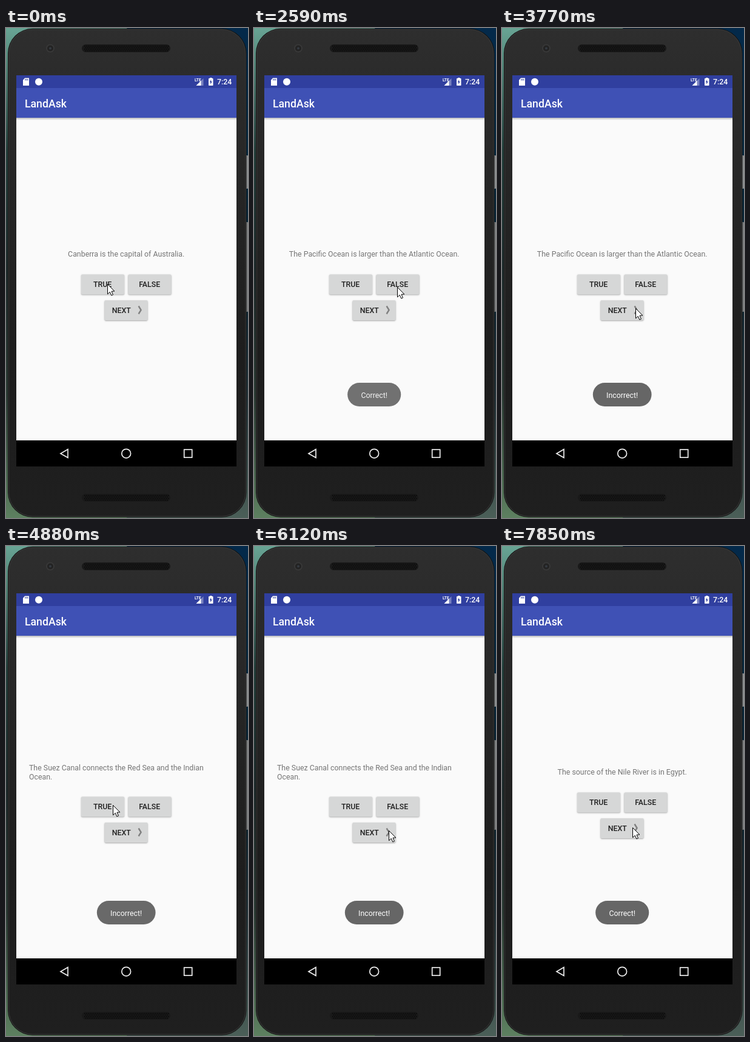
An HTML page with a canvas for the animation above (8 s loop, 399 by 808 pixels).

```html
<!DOCTYPE html>
<html lang="en">
<head>
<meta charset="utf-8">
<title>Geography quiz</title>
<style>
html, body { margin: 0; width: 100%; height: 100%; overflow: hidden; background: #1d2b30; }
canvas { display: block; width: 399px; height: 808px; }
</style>
</head>
<body>
<canvas id="stage"></canvas>
<script>
const W = 399, H = 808, LOOP = 8000;
const TICK = 136, FIRST_TICK = 480;
const MID = 198.2;

const canvas = document.getElementById('stage');
const dpr = window.devicePixelRatio || 1;
canvas.width = W * dpr;
canvas.height = H * dpr;
const ctx = canvas.getContext('2d');
ctx.scale(dpr, dpr);

const QUESTIONS = [
  { lines: ['Canberra is the capital of Australia.'], truth: 'TRUE' },
  { lines: ['The Pacific Ocean is larger than the Atlantic Ocean.'], truth: 'TRUE' },
  { lines: ['The Suez Canal connects the Red Sea and the Indian', 'Ocean.'], truth: 'FALSE' },
  { lines: ['The source of the Nile River is in Egypt.'], truth: 'FALSE' }
];
// Everything on screen follows from these taps
const TAPS = [
  { at: 480, button: 'TRUE', x: 167, y: 422 },
  { at: 1740, button: 'NEXT', x: 219, y: 462 },
  { at: 2830, button: 'FALSE', x: 236, y: 427 },
  { at: 4070, button: 'NEXT', x: 220, y: 462 },
  { at: 5150, button: 'TRUE', x: 176, y: 427 },
  { at: 6120, button: 'NEXT', x: 222, y: 469 },
  { at: 7160, button: 'FALSE', x: 241, y: 418 },
  { at: 8400, button: 'NEXT', x: 215, y: 464 }
];
const RIPPLE = 420, PAGE_DELAY = 140;
const LEAVE = 200, TRAVEL = 470;
const TOAST_DELAY = 200, TOAST_IN = 380, TOAST_END = 1950, TOAST_OUT = 330;

const clamp = v => Math.max(0, Math.min(1, v));
const smooth = p => p * p * (3 - 2 * p);
const isNext = tap => tap.button === 'NEXT';
const tapsBefore = t => TAPS.filter(tap => tap.at <= t);

function box(x, y, w, h, r, fill) {
  ctx.beginPath();
  ctx.roundRect(x, y, w, h, r);
  ctx.fillStyle = fill;
  ctx.fill();
}

function rect(x, y, w, h, fill) {
  ctx.fillStyle = fill;
  ctx.fillRect(x, y, w, h);
}

function poly(points, { fill, stroke, width = 1, closed = true }) {
  ctx.beginPath();
  points.forEach(([x, y]) => ctx.lineTo(x, y));
  if (closed) ctx.closePath();
  if (fill) {
    ctx.fillStyle = fill;
    ctx.fill();
  }
  if (stroke) {
    ctx.strokeStyle = stroke;
    ctx.lineWidth = width;
    ctx.stroke();
  }
}

function disc(x, y, r, fill) {
  ctx.beginPath();
  ctx.arc(x, y, r, 0, Math.PI * 2);
  ctx.fillStyle = fill;
  ctx.fill();
}

function label(text, x, y, { size = 12.36, weight = 400, color = '#fff', align = 'left' } = {}) {
  ctx.font = `${weight} ${size}px Roboto, sans-serif`;
  ctx.textAlign = align;
  ctx.fillStyle = color;
  ctx.fillText(text, x, y);
}

function fade(y0, y1, ...colors) {
  const g = ctx.createLinearGradient(0, y0, 0, y1);
  colors.forEach((c, i) => g.addColorStop(i / (colors.length - 1), c));
  return g;
}

function grille(y) {
  box(125, y, 146, 13, 6.5, '#191919');
  for (let row = 0; row < 4; row++)
    for (let x = 129 + row % 2 * 1.5; x < 268; x += 3)
      rect(x, y + 2 + row * 2.6, 1.5, 1.5, '#060606');
}

function drawDevice() {
  rect(0, 0, W / 2, H, fade(0, H, '#68a494', '#24403c', '#1f2b2c', '#2d3d36', '#5d8060'));
  rect(W / 2, 0, W / 2, H, fade(0, H, '#03294a', '#082a40', '#0a2230', '#24343a', '#4b5f58'));
  box(395, 210, 4, 55, 1, '#8c8e8f');
  box(395, 320, 4, 148, 1, '#7c7e7f');

  box(3, 0.8, 393.5, 806, 41, '#121212');
  box(4, 1.8, 391.5, 804, 40, '#3a3a3a');
  box(5, 2.8, 389.5, 802, 39, fade(0, H, '#2e2e2e', '#252525', '#1d1d1d', '#1f1f1f'));
  disc(73, 33.5, 7, '#383838');
  disc(73, 33.5, 5, '#232323');
  disc(73, 33.5, 2, '#343a40');
  grille(27);
  grille(768);
}

function drawStatusBar() {
  const bar = '#303f9f', white = { fill: '#fff' };
  rect(17, 78, 363, 21, bar);
  poly([[31, 82.5], [38, 82.5], [38, 95], [28, 95], [28, 86]], white);
  for (let x = 31.3; x < 37; x += 2) rect(x, 84, 1, 2.5, bar);
  disc(54, 88.7, 6, '#fff');

  label('LTE', 311, 88, { size: 6.5, weight: 700 });
  poly([[325.5, 83], [325.5, 95], [313.5, 95]], { fill: 'rgba(255,255,255,.35)' });
  poly([[321.5, 87], [321.5, 95], [313.5, 95]], white);
  box(334, 83, 7.5, 12, 0.8, '#fff');
  rect(336, 82, 3.5, 2, '#fff');
  poly([[338.3, 85], [335.6, 89.6], [337.4, 89.6], [337, 93], [339.9, 88.3], [338.1, 88.3]], { fill: bar });
  label('7:24', 348, 93, { weight: 500 });
}

function drawNavBar() {
  rect(17, 680, 363, 43, '#000');
  const line = { stroke: '#eee', width: 1.7 };
  poly([[90, 701.7], [102, 694.8], [102, 708.6]], line);
  ctx.beginPath();
  ctx.arc(MID, 701.7, 7.4, 0, Math.PI * 2);
  ctx.stroke();
  ctx.strokeRect(293.7, 695.2, 13, 13);
}

function drawChrome() {
  rect(17, 148, 363, 533, '#fafafa');
  rect(17, 148, 363, 4, fade(148, 152, 'rgba(0,0,0,.26)', 'rgba(0,0,0,0)'));
  drawStatusBar();
  rect(17, 99, 363, 49, '#3f51b5');
  label('LandAsk', 31, 130.5, { size: 17.66, weight: 500 });
  drawNavBar();
}

function drawButton(text, x, y, textX, t) {
  const tap = tapsBefore(t).pop();
  const p = tap && tap.button === text ? clamp((t - tap.at) / RIPPLE) : 1;
  const lift = p < 1 ? 1.6 : 0.9;
  ctx.save();
  ctx.shadowColor = 'rgba(0,0,0,.34)';
  ctx.shadowBlur = lift * 2.4 * dpr;
  ctx.shadowOffsetY = lift * dpr;
  box(x, y, 71, 33, 1.8, '#d6d7d7');
  ctx.restore();
  if (p < 1) {
    ctx.save();
    ctx.beginPath();
    ctx.roundRect(x, y, 71, 33, 1.8);
    ctx.clip();
    disc(tap.x, tap.y, 6 + 75 * p, `rgba(0,0,0,${0.17 * (1 - p * p)})`);
    ctx.restore();
  }
  label(text, textX, y + 21, { weight: 500, color: '#212121', align: 'center' });
}

function drawQuiz(t) {
  const { lines } = QUESTIONS[tapsBefore(t - PAGE_DELAY).filter(isNext).length];
  const wrapped = lines.length > 1;
  const dy = wrapped ? 7 : 0;
  const align = wrapped ? 'left' : 'center';
  lines.forEach((line, i) =>
    label(line, wrapped ? 38 : MID, 377 - dy + i * 14.5, { color: '#757575', align }));

  drawButton('TRUE', 124, 406.4 + dy, 159.2, t);
  drawButton('FALSE', 201.5, 406.4 + dy, 236.7, t);
  drawButton('NEXT', 162.5, 449 + dy, 190.2, t);
  const y = 465 + dy;
  poly([[218.6, y - 6.5], [222.6, y], [218.6, y + 6.5]], { stroke: '#808080', width: 2.4, closed: false });
}

function drawToast(t) {
  const answers = tapsBefore(t - TOAST_DELAY).filter(tap => !isNext(tap));
  if (!answers.length) return;
  const tap = answers[answers.length - 1];
  const right = tap.button === QUESTIONS[answers.length - 1].truth;
  const text = right ? 'Correct!' : 'Incorrect!';
  const age = t - tap.at;
  const enter = 1 - (1 - clamp((age - TOAST_DELAY) / TOAST_IN)) ** 2;
  const leave = 1 - clamp((age - TOAST_END) / TOAST_OUT) ** 2;
  ctx.globalAlpha = enter * leave;
  ctx.font = '400 12.36px Roboto, sans-serif';
  const w = ctx.measureText(text).width + 44.5;
  box(MID - w / 2, 585, w, 39, 19.5, '#666');
  label(text, MID, 609.5, { align: 'center' });
  ctx.globalAlpha = 1;
}

function drawPointer(t) {
  const done = tapsBefore(t).length;
  const to = TAPS[done], from = TAPS[done - 1] || to;
  const e = smooth(clamp((t - from.at - LEAVE) / TRAVEL));
  ctx.save();
  ctx.translate(
    Math.round(from.x + (to.x - from.x) * e) + 0.5,
    Math.round(from.y + (to.y - from.y) * e) + 0.5);
  poly([[0, 0], [0, 16.3], [3.8, 12.8], [6.3, 18.5], [9, 17.4], [6.5, 11.7], [11.4, 11.5]],
    { fill: '#fff', stroke: '#000' });
  ctx.restore();
}

// The screen is refreshed in even steps
const screenTime = t =>
  Math.max(0, FIRST_TICK + Math.floor((t - FIRST_TICK) / TICK) * TICK);

const origin = performance.now();
function frame() {
  const t = screenTime((performance.now() - origin) % LOOP);
  drawDevice();
  drawChrome();
  drawQuiz(t);
  drawToast(t);
  drawPointer(t);
  requestAnimationFrame(frame);
}
frame();
</script>
</body>
</html>
```
